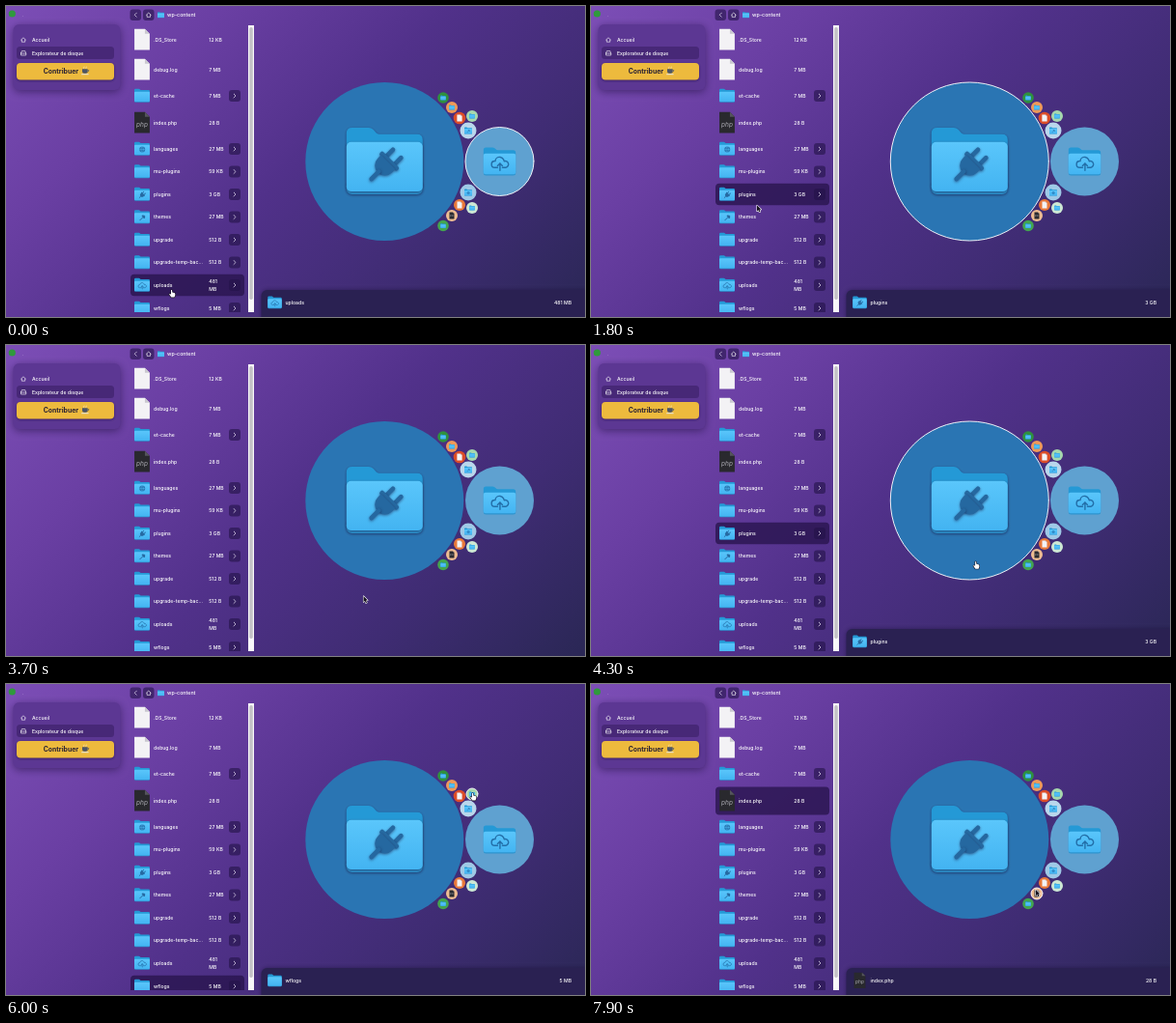
These frames come from a looping animation (600 px wide and 322 px high, 8000 ms). An HTML page with a canvas:

```html
<!DOCTYPE html>
<html lang="fr">
<head>
<meta charset="utf-8">
<style>
html, body { margin: 0; width: 100%; height: 100%; overflow: hidden; background: #52318b; }
canvas { display: block; width: 600px; height: 322px; }
</style>
</head>
<body>
<canvas id="stage"></canvas>
<script>
const W = 600, H = 322, LOOP = 8000, STEP = 100;
const canvas = document.getElementById('stage');
const dpr = window.devicePixelRatio || 1;
canvas.width = W * dpr;
canvas.height = H * dpr;
const c = canvas.getContext('2d');
const SHADE = 'rgba(36,20,72,.62)';

// name, size, centre y of the row, icon, bubble [x, y, r, colour]
const items = [
  ['.DS_Store', '12 KB', 35, 'file', [470, 206, 6, '#e9793a']],
  ['debug.log', '7 MB', 66, 'file', [470, 116, 6.3, '#dc4d28']],
  ['et-cache', '7 MB', 93, 'folder', [462, 105, 6, '#ee9a5a']],
  ['index.php', '28 B', 121, 'php', [462, 217, 6, '#efbd92']],
  ['languages', '27 MB', 148, 'globe', [479, 193, 8.5, '#9fc9e6']],
  ['mu-plugins', '59 KB', 171.5, 'folder', [483, 209, 6, '#cde8d4']],
  ['plugins', '3 GB', 195, 'plug', [392.3, 161, 82, '#2a75b3']],
  ['themes', '27 MB', 218.5, 'brush', [479, 129, 8.5, '#b9d7ec']],
  ['upgrade', '512 B', 242, 'folder', [453, 95, 5.8, '#2f913f']],
  ['upgrade-temp-backup', '512 B', 265.5, 'folder', [453, 227.5, 5.8, '#43a550']],
  ['uploads', '481 MB', 289, 'cloud', [511.5, 161, 35.5, '#5fa1d0']],
  ['wflogs', '5 MB', 313, 'folder', [483, 114, 6, '#a6d8ae']]
].map(([name, size, y, icon, b]) => ({
  name, size, y, icon,
  file: icon === 'file' || icon === 'php',
  half: icon === 'file' || icon === 'php' ? 15 : 11.75,
  bub: { x: b[0], y: b[1], r: b[2], color: b[3] }
}));
const bySize = [...items].sort((a, b) => a.bub.r - b.bub.r);

// pointer stops: time, x, y
const path = [
  [0, 171, 294], [300, 171, 294], [1100, 172, 197], [1800, 172, 206.3],
  [2800, 169, 274], [3700, 370.5, 260], [4000, 370.5, 260], [4900, 477, 122],
  [5500, 478, 125], [6000, 483, 113], [6400, 469, 116], [7000, 463, 108],
  [7900, 461, 213], [LOOP, 461, 213]
];

function pointerAt(t) {
  let i = 0;
  while (i < path.length - 2 && t >= path[i + 1][0]) i++;
  const [t0, x0, y0] = path[i], [t1, x1, y1] = path[i + 1];
  const u = (t - t0) / (t1 - t0), e = u * u * (3 - 2 * u);
  return { x: x0 + (x1 - x0) * e, y: y0 + (y1 - y0) * e };
}

function hit(p) {
  if (p.x >= 129 && p.x <= 247) return items.find(it => Math.abs(p.y - it.y) <= it.half);
  return bySize.find(({ bub }) => Math.hypot(p.x - bub.x, p.y - bub.y) <= bub.r);
}

function box(x, y, w, h, r, fill) {
  c.beginPath();
  c.roundRect(x, y, w, h, r);
  c.fillStyle = fill;
  c.fill();
}

function disc(x, y, r, fill) {
  c.beginPath();
  c.arc(x, y, r, 0, 7);
  c.fillStyle = fill;
  c.fill();
}

function line(pts, color, width) {
  c.beginPath();
  pts.forEach(([x, y]) => c.lineTo(x, y));
  c.strokeStyle = color;
  c.lineWidth = width;
  c.lineCap = c.lineJoin = 'round';
  c.stroke();
}

function text(s, x, y, size = 5.1, weight = 500, color = '#fff', align = 'left') {
  c.font = `${weight} ${size}px Inter, "Liberation Sans", sans-serif`;
  c.fillStyle = color;
  c.textAlign = align;
  c.textBaseline = 'alphabetic';
  c.fillText(s, x, y + size * .36);
}

function at(x, y, s, draw) {
  c.save();
  c.translate(x, y);
  c.scale(s, s);
  draw();
  c.restore();
}

function shadow(blur, dy, draw) {
  c.save();
  c.shadowColor = 'rgba(20,8,50,.5)';
  c.shadowBlur = blur * dpr;
  c.shadowOffsetY = dy * dpr;
  draw();
  c.restore();
}

// Marks are drawn on an 80-unit wide folder
const marks = {
  plug() {
    c.save();
    c.rotate(Math.PI / 4);
    box(-8, -19, 4.5, 13, 2, '#2568a0');
    box(4, -19, 4.5, 13, 2, '#2568a0');
    box(-13, -8, 26, 5, 2, '#2568a0');
    c.beginPath();
    c.moveTo(-10.5, -4);
    c.lineTo(10.5, -4);
    c.lineTo(10.5, 1);
    c.arc(0, 1, 10.5, 0, Math.PI);
    c.fill();
    line([[0, 10], [0, 21]], '#2568a0', 4.5);
    c.restore();
  },
  cloud() {
    c.beginPath();
    c.moveTo(-6, 11);
    c.lineTo(-13, 11);
    c.arc(-13, 3, 8, Math.PI / 2, Math.PI * 1.55);
    c.arc(-1, -4, 11, Math.PI * 1.05, Math.PI * 1.85);
    c.arc(13, 3, 8, Math.PI * 1.4, Math.PI / 2);
    c.lineTo(6, 11);
    c.strokeStyle = '#236fa9';
    c.lineWidth = 3.4;
    c.stroke();
    line([[0, 18], [0, 1]], '#236fa9', 3.4);
    line([[-6, 7], [0, 1], [6, 7]], '#236fa9', 3.4);
  },
  globe() {
    disc(0, 0, 15, '#2877b2');
    c.beginPath();
    c.ellipse(0, 0, 6, 14, 0, 0, 7);
    c.strokeStyle = '#50bdf7';
    c.lineWidth = 2;
    c.stroke();
    line([[-14, 0], [14, 0]], '#50bdf7', 2);
  },
  brush() {
    line([[-12, 14], [1, 1]], '#2568a0', 5);
    line([[2, -8], [10, 0]], '#2568a0', 9);
    line([[8, -9], [12, -5]], '#2568a0', 7);
  }
};

function folder(x, y, w, icon) {
  at(x, y, w / 80, () => {
    c.beginPath();
    c.moveTo(-40, 26);
    c.lineTo(-40, -29);
    c.quadraticCurveTo(-40, -35, -34, -35);
    c.lineTo(-17, -35);
    c.quadraticCurveTo(-13, -35, -10, -31);
    c.quadraticCurveTo(-8, -28, -4, -28);
    c.lineTo(34, -28);
    c.quadraticCurveTo(40, -28, 40, -22);
    c.lineTo(40, 26);
    c.closePath();
    c.fillStyle = '#2499d6';
    c.fill();
    const g = c.createLinearGradient(0, -20, 0, 34);
    g.addColorStop(0, '#5ac6fb');
    g.addColorStop(1, '#42b3f1');
    box(-40, 20, 80, 15, 6, '#2c94cf');
    box(-40, -20, 80, 52, 5, g);
    if (marks[icon]) at(1, 4, 1, marks[icon]);
  });
}

function page(x, y, h, dark) {
  at(x, y, h / 22, () => {
    c.beginPath();
    c.moveTo(-8, -11);
    c.lineTo(3, -11);
    c.lineTo(8, -6);
    c.lineTo(8, 11);
    c.lineTo(-8, 11);
    c.closePath();
    c.fillStyle = dark ? '#29292e' : '#f3f2f5';
    c.fill();
    c.beginPath();
    c.moveTo(3, -11);
    c.lineTo(3, -6);
    c.lineTo(8, -6);
    c.closePath();
    c.fillStyle = dark ? '#55555c' : '#c9c7cf';
    c.fill();
    if (dark) {
      c.font = 'italic 6.6px Inter, "Liberation Sans", sans-serif';
      c.textAlign = 'center';
      c.fillStyle = '#a9a9b0';
      c.fillText('php', 0, 4.5);
    }
  });
}

function icon(it, x, y, w) {
  if (it.file) page(x, y, w * 1.36, it.icon === 'php');
  else folder(x, y, w, it.icon);
}

function house(x, y) {
  line([[x - 2.4, y], [x, y - 2.2], [x + 2.4, y]], '#fff', .6);
  line([[x - 1.7, y], [x - 1.7, y + 2.2], [x + 1.7, y + 2.2], [x + 1.7, y]], '#fff', .6);
}

function chevron(x, y, dir) {
  line([[x - dir, y - 2], [x + dir, y], [x - dir, y + 2]], '#e6def2', .7);
}

function backdrop() {
  const g = c.createLinearGradient(69.5, -69.5, 530.5, 391.5);
  ['#7c4eb6', '#6a3fa3', '#51318a', '#3f2c73', '#2a2755'].forEach((k, i) => g.addColorStop(i / 4, k));
  c.fillStyle = g;
  c.fillRect(0, 0, W, H);
}

function sidebar() {
  disc(6.3, 8, 3.6, '#2f9a3c');
  text('.', 17, 9, 5, 500, '#c9b6e6');
  shadow(8, 2, () => box(7.5, 19, 111, 68, 6, '#5c3793'));
  box(11, 42, 101, 13, 3.5, '#472877');
  house(18, 35);
  text('Accueil', 27, 35);
  line([[15.5, 49], [16.4, 46.6], [19.8, 46.6], [20.7, 49]], '#fff', .6);
  line([[15.5, 49], [20.7, 49], [20.7, 51], [15.5, 51], [15.5, 49]], '#fff', .6);
  text('Explorateur de disque', 27, 48.7);
  shadow(3, 1, () => box(11, 59, 101, 17.6, 4, '#edba3d'));
  text('Contribuer', 38.7, 68, 6.9, 700, '#2a2233');
  line([[80.5, 64.5], [81, 63]], '#f4f0e8', .5);
  line([[82.8, 64.5], [83.3, 63]], '#f4f0e8', .5);
  box(79, 65.3, 5.6, 4.4, [0, 0, 2, 2], '#4b5566');
  line([[84.6, 66.4], [86, 66.8], [84.6, 68.4]], '#4b5566', .7);
  line([[78.5, 70.7], [85.2, 70.7]], '#e8eef4', .9);
}

function toolbar() {
  box(128.5, 3.5, 11.5, 11.5, 3, SHADE);
  box(142, 3.5, 11.5, 11.5, 3, SHADE);
  chevron(134.2, 9.2, -1);
  house(147.8, 9.2);
  folder(160.5, 9.3, 7, 'folder');
  text('wp-content', 167, 9.3, 5.3);
}

function list(active) {
  c.save();
  c.beginPath();
  c.rect(124, 18, 126, 299);
  c.clip();
  for (const it of items) {
    if (it === active) box(129, it.y - it.half + .5, 118, it.half * 2 - 1, 4, 'rgba(40,20,78,.78)');
    icon(it, 141, it.y - .3, 16);
    const label = it.name.length > 16 ? it.name.slice(0, 16) + '...' : it.name;
    text(label, 153, it.y);
    if (it.name === 'uploads') {
      text('481', 210.3, it.y - 3.6);
      text('MB', 210.3, it.y + 3.8);
    } else text(it.size, 210.3, it.y);
    if (!it.file) {
      box(231, it.y - 6, 12, 12, 3, SHADE);
      chevron(237, it.y, 1);
    }
  }
  c.restore();
  box(251, 20, 6, 297, 0, '#f8f7f9');
  box(252.2, 22, 3.6, 282, 1.8, '#c3c1c6');
}

function bubbles(active) {
  for (const it of items) {
    const { x, y, r, color } = it.bub;
    disc(x, y, r, color);
    if (it === active) {
      c.strokeStyle = '#fff';
      c.lineWidth = .9;
      c.stroke();
    }
    if (it.file) page(x, y, r * 1.15, it.icon === 'php');
    else if (r > 80) shadow(3, 1, () => folder(x, y - .5, 79, it.icon));
    else folder(x, y, r * .94, it.icon);
  }
}

function infoBar(it) {
  if (!it) return;
  shadow(5, 0, () => box(264.5, 294, 340, 34, [6, 0, 0, 0], '#2a2152'));
  icon(it, 278.5, 306.8, it.file ? 12 : 14.5);
  text(it.name, 289.5, 306.8);
  text(it.size, 586, 306.8, 5.1, 500, '#fff', 'right');
}

const arrow = [[0, 0], [0, 6.2], [1.4, 4.9], [2.4, 7.2], [3.5, 6.7], [2.5, 4.5], [4.4, 4.4]];
const hand = [[0, 0], [1, 0], [1.3, 2.6], [4, 3.3], [4.4, 5], [3.5, 7.6], [.3, 7.6], [-1.9, 4.6], [-1.2, 3.9], [0, 4.6]];

function pointer(p, it) {
  const overRow = p.x < 250;
  const hot = it && !it.file && (!overRow || Math.abs(p.y - it.y) < 11);
  at(p.x, p.y, 1, () => {
    c.beginPath();
    (hot ? hand : arrow).forEach(([x, y]) => c.lineTo(x, y));
    c.closePath();
    c.lineJoin = 'round';
    c.strokeStyle = hot ? '#17121f' : '#fff';
    c.lineWidth = 1.1;
    c.stroke();
    c.fillStyle = hot ? '#fff' : '#17121f';
    c.fill();
  });
}

function render(t) {
  const p = pointerAt(t), active = hit(p);
  c.setTransform(dpr, 0, 0, dpr, 0, 0);
  backdrop();
  sidebar();
  toolbar();
  list(active);
  bubbles(active);
  infoBar(active);
  pointer(p, active);
}

let start;
function tick(now) {
  start ??= now;
  const t = Math.max(0, now - start) % LOOP;
  render(Math.floor(t / STEP) * STEP);
  requestAnimationFrame(tick);
}
render(0);
requestAnimationFrame(tick);
</script>
</body>
</html>
```
